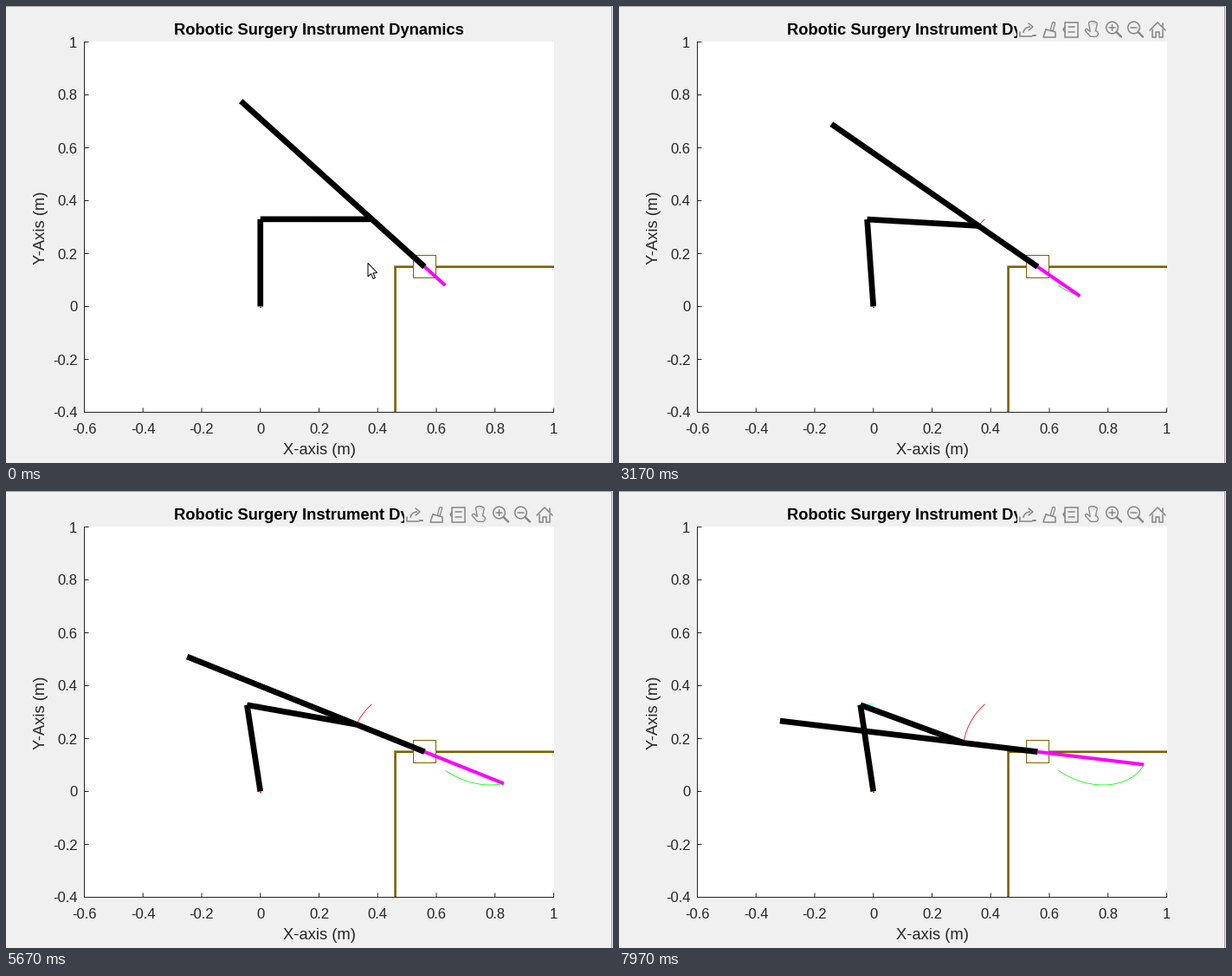
These frames come from a looping animation (701x527 px, 8 s). A matplotlib script:

```python
import numpy as np
import matplotlib.pyplot as plt
from matplotlib.animation import FuncAnimation
from matplotlib.patches import Arc, Circle, Polygon, Rectangle

W, H, DPI = 701, 527, 64
FRAMES, INTERVAL = 200, 40
PT = 72 / DPI  # points per pixel

BG, INK, BROWN, ICON = "#f0f0f0", "#262626", "#7f6000", "#858585"
UPPER, FORE, REAR, PIVOT = 0.33, 0.38, 0.886, 0.2546
PORT = np.array([0.56, 0.15])

plt.rcParams["font.family"] = "Liberation Sans"
fig = plt.figure(figsize=(W / DPI, H / DPI), dpi=DPI, facecolor=BG)
ax = fig.add_axes([0, 0, 1, 1])
ax.set_xlim(0, W)
ax.set_ylim(H, 0)
ax.axis("off")


def px(x):
    return 293.75 + 338.75 * np.asarray(x)


def py(y):
    return 346.5 - 305 * np.asarray(y)


def line(xs, ys, color, width, z=2, cap="butt"):
    return ax.plot(xs, ys, color=color, lw=width * PT, zorder=z, snap=False,
                   solid_capstyle=cap, solid_joinstyle="miter")[0]


def rect(x, y, w, h, color, z=1):
    return ax.add_patch(Rectangle((x, y), w, h, fc=color, lw=0, zorder=z))


def label(x, y, s, size, color=INK, **kw):
    kw = {"ha": "center", "va": "baseline", **kw}
    return ax.text(x, y, s, fontsize=size * PT, color=color, zorder=4, **kw)


# ---- window edges and plot area
rect(0, 0, W, 1, "#a6a6a6")
rect(699, 0, 1, H, "#9c9ca4")
rect(700, 0, 1, H, "#e4e4f2")
rect(90, 41, 543, 428, "white")

line([90.5, 90.5], [41, 469], INK, 1)
line([90, 633], [468.5, 468.5], INK, 1)
for v in np.arange(-3, 6) / 5:
    x = px(v)
    line([x, x], [463.5, 468.5], INK, 1)
    label(x, 493, f"{v:g}", 16.67)
for v in np.arange(-2, 6) / 5:
    y = py(v)
    line([90.5, 95.5], [y, y], INK, 1)
    label(82.5, y + 6, f"{v:g}", 16.67, ha="right")
label(361.5, 33, "Robotic Surgery Instrument Dynamics", 18.33, "black", weight="bold")
label(361.5, 517, "X-axis (m)", 18.33)
label(45, 256, "Y-Axis (m)", 18.33, rotation=90, rotation_mode="anchor")

# ---- body wall and entry port
line([px(0.46), px(0.46), 633], [468, py(0.15), py(0.15)], BROWN, 2.6)
ax.add_patch(Rectangle((470.5, 287.5), 26, 26, fc="white", ec=BROWN, lw=PT,
                       zorder=3, snap=False))

# ---- moving parts
rect(293, 346.5, 2, 1.6, "red", 4)
elbow_trace, wrist_trace, tip_trace = (
    line([], [], c, 0.8, 5) for c in ("cyan", "red", "lime"))
tool = line([], [], "magenta", 4, 6)
links = [line([], [], "black", 6.7, 7) for _ in range(3)]

ARROW = np.array([(0, 0), (0, 15.5), (3.6, 12.2), (6, 18), (8.4, 17),
                  (6, 11.4), (10.8, 11.2)])
cursor = ax.add_patch(Polygon(ARROW, fc="white", ec="black", lw=PT, zorder=9))


def make_toolbar():
    """Seven icons, evenly spaced; coordinates are relative to each centre."""
    parts = [rect(460, 16, 173, 23, BG, 10)]
    share, brush, tip, hand, zoom_in, zoom_out, home = 472 + 25 * np.arange(7)
    mid = 27

    def stroke(cx, pts, width=1.5, color=ICON, z=11):
        xs, ys = np.transpose(pts)
        parts.append(line(cx + xs, mid + ys, color, width, z, "round"))

    def outline(cx, pts, width):
        stroke(cx, pts, width)
        stroke(cx, pts, width - 2.6, BG, 12)

    def shape(patch):
        patch.set(fill=False, ec=ICON, lw=1.5 * PT, zorder=11)
        parts.append(ax.add_patch(patch))

    # tray with a curved arrow
    stroke(share, [(-9, 3), (-9, 8), (5, 8)])
    shape(Arc((share + 3, mid + 4), 16, 14, theta1=180, theta2=270))
    stroke(share, [(1, -7), (6, -3), (1, 1)])
    stroke(share, [(6, 7), (9, 7)], 2)

    outline(brush, [(5, -7), (3, 0)], 4.4)
    stroke(brush, [(-4, 0), (7, 3), (7, 9), (-7, 9), (-4, 0)])

    shape(Rectangle((tip - 7, mid - 8.5), 15, 17))
    for y in (-3, 3):
        stroke(tip, [(-3, y), (4, y)])
    stroke(tip, [(-7, -3), (-9, 0), (-7, 3)])

    # hand: fingers fan out from the palm
    for a in np.radians([-20, -5, 10, 28]):
        reach = 9 - 6 * a * a
        outline(hand, [(3 * np.sin(a), 3), (reach * np.sin(a), 1 - reach)], 4.6)
    outline(hand, [(-7, 1), (-2, 6)], 4.6)
    outline(hand, [(-1, 5), (3, 5)], 8)

    for cx in (zoom_in, zoom_out):
        shape(Circle((cx - 2.5, mid - 2), 6.8))
        stroke(cx, [(2.5, 3), (8, 8.5)], 2.4)
        stroke(cx, [(-6, -2), (1, -2)])
    stroke(zoom_in, [(-2.5, -5.5), (-2.5, 1.5)])

    stroke(home, [(-9, 1), (0, -8), (9, 1)])
    stroke(home, [(-6, 0), (-6, 9), (-2, 9), (-2, 3), (2, 3), (2, 9), (6, 9), (6, 0)])
    stroke(home, [(6, -7), (6, -3)])
    return parts


toolbar = make_toolbar()


def pose(t):
    """Elbow, wrist, rear end and tip at t seconds (t may be an array)."""
    a = np.radians(45 - t**2 * (0.874 - 0.0455 * t + 0.00125 * t**2))
    reach = 0.0995 + t**2 * (0.0108 - 0.00083 * t)
    u = np.array([np.cos(a), -np.sin(a)])
    port = PORT.reshape((2,) + (1,) * np.ndim(t))
    wrist, rear, tip = port - PIVOT * u, port - REAR * u, port + reach * u
    d = np.hypot(*wrist)
    bend = np.arccos((UPPER**2 + d**2 - FORE**2) / (2 * UPPER * d))
    b = np.arctan2(wrist[1], wrist[0]) + bend
    return UPPER * np.array([np.cos(b), np.sin(b)]), wrist, rear, tip


STALL_END, STEP = 690, 95.6


def last_redraw(ms):
    """Time of the latest simulation redraw; the plot stalls once early on."""
    if ms < STALL_END:
        return min(int(ms / 96), 3) * 96
    return STALL_END + int((ms - STALL_END) / STEP) * STEP


def place(artist, *points):
    xs, ys = zip(*points)
    artist.set_data(px(xs), py(ys))


def update(i):
    now = last_redraw(i * INTERVAL + 35)
    t = now / 1000
    elbow, wrist, rear, tip = pose(t)
    place(links[0], (0, 0), elbow)
    place(links[1], elbow, wrist)
    place(links[2], rear, PORT)
    place(tool, PORT, tip)

    elbows, wrists, _, tips = pose(np.linspace(0, t, 60))
    for trace, (x, y) in ((elbow_trace, elbows), (wrist_trace, wrists),
                          (tip_trace, tips)):
        trace.set_data(px(x), py(y))

    hovered = now >= STALL_END
    for part in toolbar:
        part.set_visible(hovered)
    drop = 110 * (1 + (now - STALL_END) / STEP) if hovered else 0
    cursor.set_xy(ARROW + (418, 296.5 + drop))
    cursor.set_visible(drop < 230)
    return []


anim = FuncAnimation(fig, update, frames=FRAMES, interval=INTERVAL,
                     init_func=lambda: update(0), repeat=True, repeat_delay=0)
plt.show()
```
